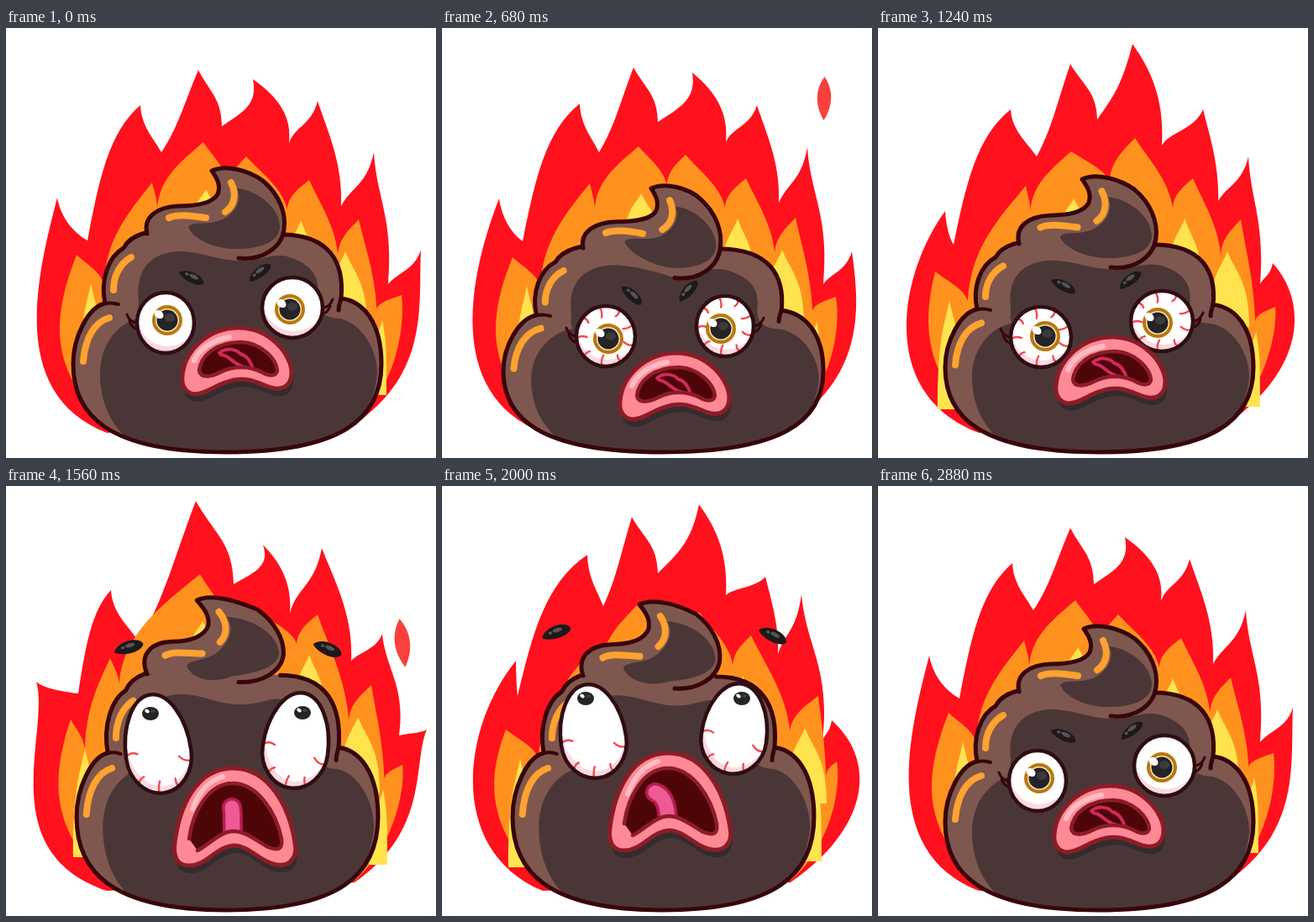
An HTML page with a canvas for the animation above (2.9 s loop, 512 by 512 pixels).

```html
<!DOCTYPE html>
<html>
<head>
<meta charset="utf-8">
<style>
html, body { margin: 0; width: 100%; height: 100%; overflow: hidden; background: #fff; }
canvas { display: block; width: 100vw; height: 100vh; }
</style>
</head>
<body>
<canvas id="c" width="512" height="512"></canvas>
<script>
const g = document.getElementById('c').getContext('2d');
const LOOP = 2900, FLICKER = 720;
const INK = '#38060a', BROWN = '#7e574f', DARK = '#4b3637', GLOW = '#ffa22f';
const RED = '#ff111d', ORANGE = '#ff921f', YELLOW = '#ffe44f';

const mix = (a, b, k) => a + (b - a) * k;
const clamp = v => Math.max(0, Math.min(1, v));
const smooth = k => { k = clamp(k); return k * k * (3 - 2 * k); };
const nums = s => s.match(/-?[\d.]+/g).map(Number);

// ---------- timing ----------
const KEYS = [0, 680, 1240, 1560, 2000, 2400, 2880];
function at(t, ...v) {
  let i = 0;
  while (i < KEYS.length - 2 && t >= KEYS[i + 1]) i++;
  return mix(v[i], v[i + 1], smooth((t - KEYS[i]) / (KEYS[i + 1] - KEYS[i])));
}
const scream = t => smooth((t - 1340) / 140) * (1 - smooth((t - 2130) / 170));

// ---------- drawing helpers ----------
// Points: a start, then groups of three for each cubic curve.
function trace(p, map) {
  const q = [];
  for (let i = 0; i < p.length; i += 2) q.push(...(map ? map(p[i], p[i + 1]) : [p[i], p[i + 1]]));
  g.beginPath();
  g.moveTo(q[0], q[1]);
  for (let i = 2; i < q.length; i += 6) g.bezierCurveTo(...q.slice(i, i + 6));
}
function fill(c) { g.fillStyle = c; g.fill(); }
function stroke(c, w) { g.strokeStyle = c; g.lineWidth = w; g.stroke(); }
function oval(x, y, rx, ry, c, rot = 0) {
  g.beginPath();
  g.ellipse(x, y, Math.max(rx, 0), Math.max(ry, 0), rot, 0, 7);
  fill(c);
}

// ---------- fire ----------
const poses = [];
function pose(time, side, tips, dips, inner) {
  poses.push({ time, v: nums([side, tips, dips, inner].join(' ')) });
}
pose(0, 0, '61,202 160,92 229,50 294,61 371,87 438,148 494,264',
  '97,253 185,148 257,117 337,137 399,212 455,305',
  '84,270 174,184 235,136 286,153 361,181 420,228 471,318');
pose(120, -18, '36,233 125,124 226,18 306,70 376,74 448,176 501,290',
  '86,247 158,185 271,117 338,152 411,208 468,297',
  '77,278 124,205 231,105 300,150 371,153 435,237 472,332');
pose(240, -33, '41,228 115,107 237,42 316,61 368,101 452,177 493,297',
  '86,273 158,170 277,138 343,122 414,235 470,308',
  '70,296 137,196 239,108 310,148 367,170 433,256 466,334');
pose(520, -3, '80,218 158,97 229,43 303,19 387,97 441,153 470,280',
  '90,258 189,153 261,109 338,140 405,206 455,305',
  '68,290 176,188 230,147 306,131 375,179 432,228 473,332');
pose(560, 7, '88,208 173,82 226,37 306,22 385,108 428,129 464,279',
  '90,250 192,143 257,104 338,130 400,200 453,303',
  '76,290 184,188 232,142 306,150 368,178 448,250 470,328');
pose(680, 1, '68,203 164,90 228,47 298,53 375,92 435,142 488,266',
  '96,254 187,148 257,112 338,136 401,208 454,305',
  '84,273 176,185 234,141 290,151 362,179 421,226 469,320');
poses.push({ time: FLICKER, v: poses[0].v });

// Curve controls as fractions of each edge.
const RISE = ['', '.22,.45,.4,.8', '.45,.3,.62,.6', '', '.2,.4,.78,.42', '.3,.35,.8,.4', '.3,.35,.8,.4'];
const FALL = ['.1,.4,.45,.78', '.05,.45,.6,.68', '.5,.4,.98,.5', '.75,.3,1.08,.6', '.45,.3,1.08,.6', '.2,.35,1.4,.5'];

function edge(a, b, f) {
  const dx = b[0] - a[0], dy = b[1] - a[1];
  g.bezierCurveTo(a[0] + dx * f[0], a[1] + dy * f[1], a[0] + dx * f[2], a[1] + dy * f[3], b[0], b[1]);
}
function pairs(v) {
  const out = [];
  for (let i = 0; i < v.length; i += 2) out.push([v[i], v[i + 1]]);
  return out;
}
function outer(side, tips, dips) {
  g.beginPath();
  g.moveTo(120, 482);
  g.bezierCurveTo(side, 435, 75 - tips[0][0] * .6, 290, ...tips[0]);
  for (let i = 0; i < 6; i++) {
    edge(tips[i], dips[i], nums(FALL[i]));
    const n = tips[i + 1];
    const curl = clamp((90 - dips[i][1] + n[1]) / 40);
    edge(dips[i], n, i === 2 ? [.45 + .25 * curl, .3, .7 + .55 * curl, .45] : nums(RISE[i + 1]));
  }
  const e = tips[6];
  g.bezierCurveTo(985 - e[0], 330, 505, 410, 415, 472);
  fill(RED);
}
function middle(tips) {
  const fx = [.36, .1, .6, .65, .58, .42], dy = [35, 30, 36, 35, 42, 17];
  g.beginPath();
  g.moveTo(130, 480);
  g.bezierCurveTo(48, 410, 55, 345, ...tips[0]);
  for (let i = 0; i < 6; i++) {
    const a = tips[i], b = tips[i + 1];
    const d = [mix(a[0], b[0], fx[i]), Math.max(a[1], b[1]) + dy[i]];
    edge(a, d, [.35, .3, .9, .6]);
    edge(d, b, [.05, .45, .5, .7]);
  }
  g.bezierCurveTo(476, 360, 462, 430, 415, 470);
  fill(ORANGE);
}
function tongue(x, y, w, h, lean) {
  g.beginPath();
  g.moveTo(x, y);
  g.bezierCurveTo(x - w * .25, y + h * .2, x - w + lean, y + h * .3, x - w + lean, y + h);
  g.lineTo(x + w + lean, y + h);
  g.bezierCurveTo(x + w + lean, y + h * .4, x + w * .45, y + h * .3, x, y);
  fill(YELLOW);
}
function spark(t, seen, x, y, w, h, rot) {
  const d = t - seen;
  if (d < -220 || d > 260) return;
  const k = clamp((260 - d) / 260);
  g.save();
  g.translate(x, y - d * .36);
  g.rotate(rot);
  g.scale(k, k);
  trace([0, -h, w, -h * .4, w, h * .3, 0, h, -w, h * .3, -w, -h * .4, 0, -h]);
  fill('#f9403c');
  g.restore();
}
function fire(t) {
  spark(t, 680, 455, 84, 11, 26, .02);
  spark(t, 1560, 472, 187, 12, 29, -.12);
  spark(t, 2400, 91, 130, 11, 25, .32);
  spark(t, 2400, 441, 180, 7, 14, .25);

  const p = t % FLICKER;
  let i = 0;
  while (p >= poses[i + 1].time) i++;
  const a = poses[i], b = poses[i + 1], k = (p - a.time) / (b.time - a.time);
  const v = a.v.map((n, j) => mix(n, b.v[j], k));
  const inner = pairs(v.slice(27));
  outer(v[0], pairs(v.slice(1, 15)), pairs(v.slice(15, 27)));
  middle(inner);
  const glow = (j, dx, dy, w, h, lean) => tongue(inner[j][0] + dx, inner[j][1] + dy, w, h, lean);
  glow(0, 17, 34, 17, 130, 3);
  glow(2, 3, 56, 20, 60, 0);
  glow(4, -10, 48, 22, 90, 0);
  glow(5, -16, 38, 24, 90, 2);
  glow(6, -23, 29, 11, 90, -6);
}

// ---------- body ----------
const BODY = nums(`205,240 170,240 148,246 140,262 122,272 112,300 118,328
  98,332 80,368 80,400 80,460 120,505 262,505 400,505 447,465 447,400
  447,350 425,325 399,322 403,280 386,246 328,246`);
const FACE = nums(`158,325 154,290 170,268 205,266 235,266 250,277 280,277 305,277 315,268 335,272
  368,282 374,300 371,322 372,340 380,345 398,346 425,352 442,385 442,410
  440,450 415,480 390,505 320,520 220,520 160,500 125,480 112,445 112,412 112,375 135,350 160,345 156,340 158,332 158,325`);
const SWIRL = nums(`168,245 163,225 180,213 205,212 230,212 246,208 252,198 256,188 252,180 245,170
  262,162 290,170 306,182 325,198 334,220 331,240 328,262 305,277 277,274`);
const SHADE = nums(`275,191 300,193 327,215 326,238 324,258 295,264 270,263 245,262 222,250 217,237
  222,229 240,236 258,228 273,220 282,205 275,191`);

function body(t) {
  const left = at(t, 80, 73, 80, 84, 84, 76, 80);
  const tipX = at(t, 245, 249, 243, 227, 235, 227, 245);
  const tipY = at(t, 169, 190, 179, 135, 140, 149, 169);
  const mid = at(t, 245, 262, 257, 224, 226, 241, 245);
  const notch = at(t, 328, 342, 335, 318, 318, 328, 328);
  const curl = at(t, 274, 298, 285, 232, 240, 246, 274);
  const wide = (263 - left) / 183;

  const mapY = y => y < 245 ? tipY + (y - 169) * (mid - tipY) / 76
    : y < 328 ? mix(mid, notch, (y - 245) / 83)
    : mix(notch, 505, (y - 328) / 177);
  const warp = (x, y) => [263 + (x - 263) * wide, mapY(y)];
  const twist = (x, y) => [
    x + (tipX - 245) * clamp((245 - y) / 76) * (x > 290 ? .45 : 1),
    mix(mapY(y), tipY + (y - 169) * (curl - tipY) / 105, clamp((x - 230) / 50))
  ];
  const line = (s, map, c, w) => { trace(nums(s), map); stroke(c, w); };

  trace(BODY, warp);
  fill(BROWN);
  g.save();
  g.clip();
  trace(FACE, warp);
  fill(DARK);
  g.restore();
  trace(BODY, warp);
  stroke(INK, 5);
  line('399,322 398,326 396,330 396,336', warp, INK, 5);
  line('118,328 123,327 128,327 134,329', warp, INK, 4);
  line('123,345 105,350 94,370 92,397', warp, GLOW, 8);
  line('149,273 136,280 128,295 128,312', warp, GLOW, 8);

  trace(SWIRL, twist);
  fill(BROWN);
  trace(SHADE, twist);
  fill(DARK);
  trace(SWIRL, twist);
  stroke(INK, 5);
  line('194,226 205,221 222,224 238,226', twist, GLOW, 8);
  line('268,184 275,198 272,212 261,219', twist, GLOW, 8);
}

// ---------- face ----------
function egg(rx, ry, e) {
  const m = e * ry, u = .55 * (ry + m), d = .55 * (ry - m), w = .55 * rx;
  trace([0, -ry, w, -ry, rx, m - u, rx, m, rx, m + d, w, ry, 0, ry,
    -w, ry, -rx, m + d, -rx, m, -rx, m - u, -w, -ry, 0, -ry]);
}
function eye(x, y, rx, ry, px, py, s, side, veins) {
  g.save();
  g.translate(x, y);
  if (s < 1) {
    g.globalAlpha = 1 - s;
    for (const n of [0, 1]) {
      const lx = side * (rx + 1 - n * 3), ly = n * 8 - 2;
      trace([lx, ly + 2, lx + side * 5, ly + 1, lx + side * 9, ly - 2, lx + side * 11, ly - 8]);
      stroke(INK, 3);
    }
    g.globalAlpha = 1;
  }
  g.save();
  g.rotate(side * .14 * s);
  egg(rx, ry, .22 * s);
  fill('#fbd9e1');
  g.save();
  g.clip();
  oval(2, -8, rx + 1, ry, '#fff');
  for (let i = 0; i < 9; i++) {
    const a = i * Math.PI * 2 / 9 + .3;
    const show = veins * (Math.sin(a) > -.1 ? 1 : 1 - s);
    if (show < .02) continue;
    const r = 1 - (i % 2 ? .26 : .36) * show;
    const m = (1 + r) / 2, cx = Math.cos(a), cy = Math.sin(a), oy = ry * .12 * s;
    g.beginPath();
    g.moveTo(cx * rx, cy * ry + oy);
    g.quadraticCurveTo(Math.cos(a + .1) * rx * m, Math.sin(a + .1) * ry * m + oy, cx * rx * r, cy * ry * r + oy);
    stroke('#ef4b50', 2.4);
  }
  g.restore();
  egg(rx, ry, .22 * s);
  stroke('#2f0d12', 4.5);
  g.restore();

  oval(px, py, mix(18, 8, s), mix(18, 7, s), '#b9780c');
  oval(px, py, mix(14, 8, s), mix(14, 7, s), '#f7e6bd');
  oval(px, py, mix(12.5, 10, s), mix(12.5, 8, s), '#252326');
  oval(px + 3, py - 3, mix(6, 3, s), mix(5, 2, s), '#3c3a3d');
  oval(px - mix(10, 4, s), py - mix(7, 3, s), mix(6, 3, s), mix(4.5, 2, s), '#fff', .6);
  g.restore();
}
function brow(x, y, deg, s) {
  g.save();
  g.translate(x, y);
  g.rotate(deg * Math.PI / 180);
  const r = mix(16, 18, s), h = mix(8, 10, s);
  trace([-r, 2, -r * .7, -h, r * .8, -h * 1.1, r, 0, r * .8, h, -r * .6, h * .9, -r, 2]);
  fill('#1d191b');
  oval(2, -2, 6, 2.4, '#575456');
  oval(-7, -1, 2.2, 1.8, '#575456');
  g.restore();
}

const LIPS = [nums(`210,415 212,385 240,357 277,357 315,357 340,390 340,410
  340,427 328,432 315,428 300,423 290,416 272,419 250,423 240,436 224,436 213,434 209,425 210,415`),
  nums(`201,425 206,385 225,336 270,336 315,336 338,385 344,425
  348,445 335,455 318,450 300,445 290,429 272,428 250,429 240,452 218,452 203,452 199,440 201,425`)];
const HOLE = [nums(`230,408 232,390 250,374 280,374 305,375 322,395 323,408
  321,416 312,414 305,410 290,402 270,402 255,410 243,416 232,417 230,408`),
  nums(`218,420 222,390 240,354 270,354 300,354 322,390 328,420
  330,434 322,434 312,430 295,420 285,411 270,411 255,412 240,428 228,434 218,436 216,430 218,420`)];
const SHINE = [nums('224,396 229,384 243,372 266,368'), nums('222,385 228,368 238,352 258,346')];

function mouth(t, s) {
  const morph = p => p[0].map((n, i) => mix(n, p[1][i], s));
  g.save();
  g.translate(at(t, 0, 2, 2, 0, -1, -1, 0), at(t, 0, 30, 11, 0, -18, -6, 0));
  const lips = morph(LIPS), hole = morph(HOLE);
  trace(lips, (x, y) => [x + 2, y + 9]);
  fill('#332b2d');
  trace(lips);
  fill('#ff8a95');
  stroke('#8c1c27', 5);
  trace(morph(SHINE));
  stroke('#ffbcc5', 6);
  trace(hole);
  fill('#4d0508');
  g.save();
  g.clip();
  g.globalAlpha = 1 - s;
  trace(nums('254,387 262,380 274,382 279,388 287,390 292,398 294,406'));
  stroke('#d3295a', 4);
  trace(nums('256,389 268,390 270,402 286,404'));
  stroke('#d3295a', 4);
  g.globalAlpha = s;
  const lean = at(t, 0, 0, 0, 0, 14, 14, 0);
  for (const [c, w] of [['#b81d50', 24], ['#ee5a95', 17]]) {
    g.beginPath();
    g.moveTo(269 - lean, 383);
    g.quadraticCurveTo(270, 388, 270, 420);
    stroke(c, w);
  }
  g.restore();
  trace(hole);
  stroke('#8c1c27', 4.5);
  g.restore();
}
function face(t) {
  const s = scream(t);
  const k = smooth((t - 1560) / 440);
  const veins = smooth((t - 120) / 480) * (1 - smooth((t - 2450) / 330));
  const both = (a, b, c) => mix(a, mix(b, c, k), s);

  eye(both(at(t, 190, 195, 194, 194, 188, 188, 190), 180, 179),
    both(at(t, 351, 367, 368, 368, 380, 380, 351), 307, 292),
    mix(at(t, 34, 35, 36, 36, 33, 33, 34), 39, s), both(36, 59, 56),
    both(at(t, 2, 3, 5, 5, 5, 5, 2), -8, -8), both(at(t, -3, 3, -1, -1, -5, -5, -3), -36, -39),
    s, -1, veins);
  eye(both(at(t, 341, 337, 338, 338, 338, 338, 341), 346, 349),
    both(at(t, 333, 355, 349, 349, 367, 367, 333), 303, 289),
    mix(at(t, 36, 34, 37, 37, 34, 34, 36), 39, s), both(36, 57, 54),
    both(at(t, -3, -5, -5, -5, -6, -6, -3), 7, 8), both(at(t, 2, 3, 2, 2, 0, 0, 2), -33, -36),
    s, 1, veins);

  brow(both(at(t, 221, 226, 221, 221, 206, 206, 221), 146, 136),
    both(at(t, 297, 318, 307, 307, 292, 292, 297), 192, 174),
    both(at(t, 27, 45, 30, 30, 28, 28, 27), -14, -17), s);
  brow(both(at(t, 302, 293, 300, 300, 317, 317, 302), 383, 394),
    both(at(t, 291, 313, 300, 300, 287, 287, 291), 194, 178),
    both(at(t, -35, -45, -35, -35, -35, -35, -35), 25, 28), s);
  mouth(t, s);
}

function frame(now) {
  const t = Math.floor((now % LOOP) / 20) * 20;
  g.fillStyle = '#fff';
  g.fillRect(0, 0, 512, 512);
  g.lineCap = g.lineJoin = 'round';
  fire(t);
  body(t);
  face(t);
  requestAnimationFrame(frame);
}
frame(0);
</script>
</body>
</html>
```
